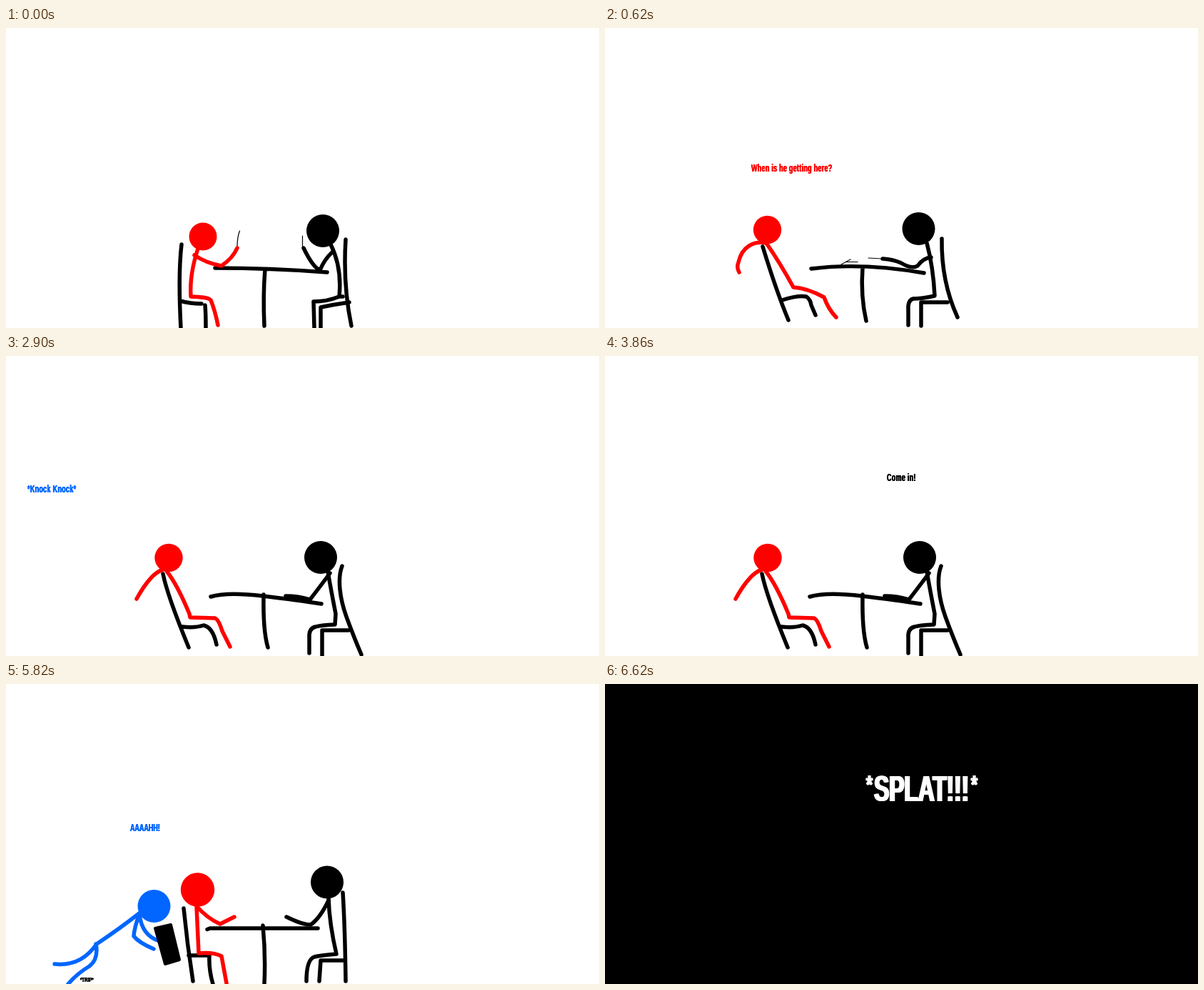
An HTML page with a canvas that plays this animation: 831 px wide and 420 px high, repeating every 8 s.

```html
<!DOCTYPE html>
<html lang="en">
<head>
<meta charset="utf-8">
<title>Dinner guest</title>
<style>
html, body { margin: 0; width: 100%; height: 100%; overflow: hidden; background: #fff; }
canvas { display: block; }
</style>
</head>
<body>
<canvas id="stage" width="831" height="420"></canvas>
<script>
const ctx = document.getElementById('stage').getContext('2d');
const LOOP = 8000;
const RED = '#f00', BLUE = '#06f', BLACK = '#000';
const CONDENSE = 0.64;

function line(color, path, width = 5.5) {
  ctx.strokeStyle = color;
  ctx.lineWidth = width;
  ctx.stroke(new Path2D(path));
}

function head(color, x, y, r = 23) {
  ctx.fillStyle = color;
  ctx.beginPath();
  ctx.arc(x, y, r, 0, Math.PI * 2);
  ctx.fill();
}

function box(path) {
  ctx.fillStyle = BLACK;
  ctx.fill(new Path2D(path));
  line(BLACK, path, 4);
}

// Condensed lettering; sideways copies thicken the upright stems
function say(text, x, y, size, color, spacing = 0) {
  ctx.save();
  ctx.translate(x, y);
  ctx.scale(CONDENSE, 1);
  ctx.font = `bold ${size}px "Liberation Sans", Arial, sans-serif`;
  ctx.letterSpacing = spacing + 'px';
  ctx.fillStyle = color;
  for (const shift of [-0.04, 0, 0.04]) ctx.fillText(text, shift * size, 0);
  ctx.restore();
}

function dining() {
  line(BLACK, 'M246 303Q241 345 245 420M244 382Q258 386 274 386M279 388Q280 400 280 420');
  line(BLACK, 'M293 336Q370 336 450 342M363 338Q360 375 362 417');
  line(BLACK, 'M476 296Q472 360 484 417M481 384Q460 387 441 391V420');
  line(BLACK, 'M455 303Q471 335 467 376Q450 383 431 383L432 420M467 376H472');
  line(BLACK, 'M458 313Q446 324 440 339Q430 335 417 308');
  line(BLACK, 'M324 306Q324 293 327.5 284M415.5 291V306L418 309', 1.2);
  line(RED, 'M269 309Q257 345 259 376C275 377 284 377 287 381Q293 396 297 416');
  line(RED, 'M264 318Q280 329 302 333Q318 322 324 308');
  head(RED, 276, 292, 19.5);
  head(BLACK, 444, 284);
}

function leaning() {
  line(BLACK, 'M221 306Q240 368 257 409M248 381Q270 374 282 376Q288 380 289 388L295 402');
  line(BLACK, 'M289 337Q360 328 447 343M361 335Q358 375 366 410');
  line(BLACK, 'M472 295Q471 355 494 405M480 384H443V417');
  line(BLACK, 'M451 301Q460 335 462 375Q444 379 432 379Q424 381 425 395V416');
  line(BLACK, 'M457 321Q446 322 438 333Q430 338 415 329Q404 324 389 323');
  line(BLACK, 'M331 331L344 324M337 327.5H354M369 322L388 323', 1.2);
  line(RED, 'M226 301Q246 330 264 363Q283 364 307 377Q313 394 324 405');
  line(RED, 'M226 301C208 298 192 306 187 328Q184 335 188 342');
  head(RED, 227.5, 282.5, 19.7);
  head(BLACK, 439.5, 281);
}

function waiting() {
  line(BLACK, 'M220 305Q226 335 256 408M247 379Q265 381 277 377Q290 380 295 404');
  line(BLACK, 'M287 337Q310 330 360 336T442 347M361 334Q360 385 367 408');
  line(BLACK, 'M471 294C464 312 468 340 477 365Q488 395 498 418M480 384H443V419');
  line(BLACK, 'M451 302Q455 325 462 361L461 376Q440 377 434 379Q424 381 425 395V416');
  line(BLACK, 'M454 304Q446 315 426 341Q410 336 392 336');
  line(RED, 'M225 301Q240 320 257 361L258 366L293 367Q298 369 303 385L314 407');
  line(RED, 'M220 299Q203 304 183 340');
  head(RED, 228, 282.5, 19.7);
  head(BLACK, 441, 282);
}

function arriving() {
  line(BLUE, 'M77 277L51 345M76 276Q72 310 75 319Q90 326 113 327');
  line(BLUE, 'M51 346C60 370 59 392 37 418M51 346C72 378 70 395 57 417');
  head(BLUE, 86, 254);
  box('M87 295L137 308L132 330L81 316Z');
  line(BLACK, 'M220 313Q238 352 259 413M251 383Q268 375 276 377Q284 385 291 408');
  line(BLACK, 'M284 340.5H441M360 335L361 420');
  line(BLACK, 'M471 293L473.5 420M473 387H441L439 420');
  line(BLACK, 'M451 300Q453 330 461 379L428 383Q421 395 421 418');
  line(BLACK, 'M451 308Q438 327 426 337Q412 334 392 324');
  line(RED, 'M224 302Q238 340 259 367Q280 369 297 374L301 383L311 412');
  line(RED, 'M222 303Q196 315 182 343');
  head(RED, 228.5, 281, 23.7);
  head(BLACK, 448, 277.5);
  ctx.fillRect(617, 257, 1, 1);
}

function tripping() {
  line(BLUE, 'M188 320Q160 342 127 364Q105 396 68 392M126 364Q130 385 117 395Q100 405 87 420');
  line(BLUE, 'M187 322Q180 340 179 353Q186 362 207 371M187 322Q190 352 215 360');
  head(BLUE, 207.5, 311);
  box('M209 342L231 337L243 386L223 392Z');
  line(BLACK, 'M249 314Q254 365 262 416M256 380H285Q284 400 290 420');
  line(BLACK, 'M282 343.5L286 342H437M360 338Q364 380 362 420');
  line(BLACK, 'M472 292Q475 340 476 416M474 387H441L439 416');
  line(BLACK, 'M452 300Q453 335 463 378Q440 380 432 382Q421 386 421 416');
  line(BLACK, 'M452 303Q440 328 427 337Q415 337 393 326');
  line(RED, 'M267 311L270 377Q290 375 302 381L309 419');
  line(RED, 'M267 311Q282 328 300 336L320 326');
  head(RED, 268.5, 288, 23.7);
  head(BLACK, 450, 277.5);
}

function splat() {
  ctx.fillStyle = BLACK;
  ctx.fillRect(0, 0, 831, 420);
  say('*', 366, 154, 36, '#fff');
  say('SPLAT!!!', 377, 163.5, 50, '#fff', -0.3);
  say('*', 513, 154, 36, '#fff');
}

const scenes = [
  [0, dining],
  [500, leaning],
  [620, () => { leaning(); say('When is he getting here?', 205, 201, 14, RED, 0.45); }],
  [1700, () => { leaning(); say("He'll get here when he gets here", 302, 196, 15, BLACK, 0.45); }],
  [2900, () => { waiting(); say('*Knock Knock*', 30, 191, 14, BLUE, 0.5); }],
  [3860, () => { waiting(); say('Come in!', 395, 175, 14, BLACK, 0.45); }],
  [4860, () => { arriving(); say("SORRY I'M LATE, PICKED UP A CAKE FRO-", 143, 157.5, 13.5, BLUE, 0.05); }],
  [5820, () => {
    tripping();
    say('AAAAHH!', 174, 206, 14, BLUE);
    say('*TRIP*', 104, 416.5, 9.5, BLACK);
  }],
  [6620, splat]
];

ctx.lineCap = ctx.lineJoin = 'round';
const start = performance.now();

function draw(now) {
  const t = Math.max(0, now - start) % LOOP;
  ctx.fillStyle = '#fff';
  ctx.fillRect(0, 0, 831, 420);
  scenes.findLast(([from]) => from <= t)[1]();
  requestAnimationFrame(draw);
}
draw(start);
</script>
</body>
</html>
```
